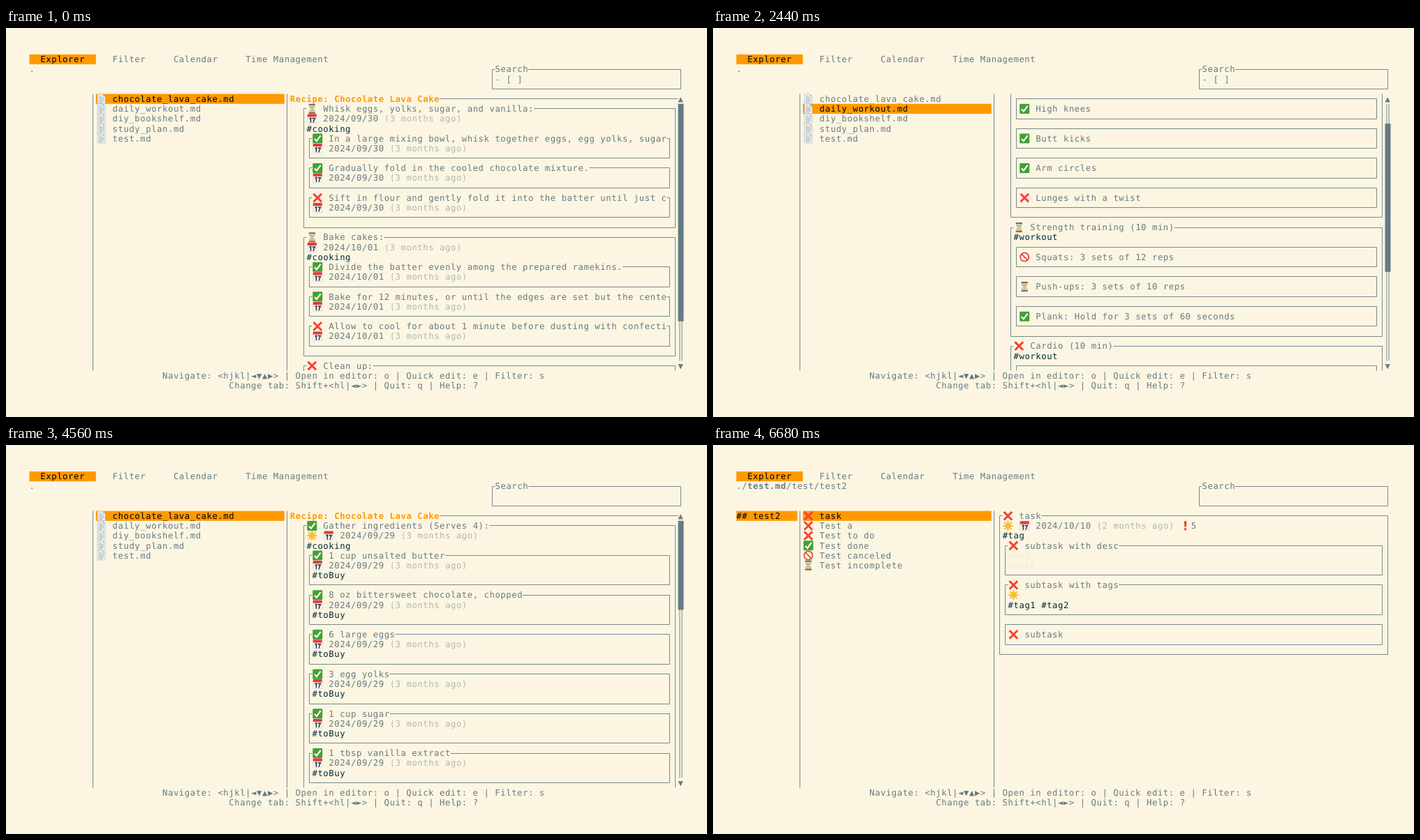
These frames come from a looping animation (1004 by 558 pixels, 8000 ms). An HTML page:

```html
<!DOCTYPE html>
<html lang="en">
<head>
<meta charset="utf-8">
<title>Task explorer</title>
<style>
  html, body { margin: 0; width: 100%; height: 100%; overflow: hidden; background: #fcf5e2; }
  svg { display: block; width: 100%; height: 100%; }
  .cell { font: 12.27px "DejaVu Sans Mono", monospace; letter-spacing: .554px; white-space: pre; text-rendering: geometricPrecision; }
  .bold { font-weight: bold; }
  .line { fill: none; stroke: #657b83; stroke-opacity: .88; }
</style>
</head>
<body>
<svg viewBox="0 0 1004 558">
  <defs>
    <clipPath id="pane"><rect x="404" y="94.6" width="600" height="397"/></clipPath>
    <symbol id="done" viewBox="0 0 16 16">
      <rect x=".4" y=".4" width="15.2" height="15.2" rx="1.4" fill="#43a035"/>
      <path d="M3.4 8.6 6.5 12 12.7 3.6" fill="none" stroke="#fff" stroke-width="2.3"/>
    </symbol>
    <symbol id="todo" viewBox="0 0 16 16">
      <path d="M1.7 1.7 14.3 14.3M14.3 1.7 1.7 14.3" stroke="#f44336" stroke-width="3.2"/>
    </symbol>
    <symbol id="wait" viewBox="0 0 16 16">
      <path d="M4 2h8v2.5Q12 6.5 9 8q3 1.5 3 3.500V14H4v-2.500Q4 9.500 7 8 4 6.500 4 4.500z" fill="#b9d5da" stroke="#8d8f86" stroke-width=".6"/>
      <path d="M4.700 4.500h6.600Q11 6.500 8.400 7.600V11l3 2.300H4.600L7.600 11V7.600Q5 6.500 4.700 4.500z" fill="#f6b62b"/>
      <path d="M3 .4h10v2H3zM3 13.600h10v2H3z" fill="#8a6450"/>
    </symbol>
    <symbol id="date" viewBox="0 0 16 16">
      <rect x="1" y=".8" width="14" height="14.600" rx="1" fill="#f5f5f3" stroke="#b8bfc1" stroke-width=".5"/>
      <path d="M1 5.300V1.800q0-1 1-1h12q1 0 1 1v3.500z" fill="#e5393d"/>
      <path d="M4 8.200 6 7v7.200M8.200 7.500h4.200q-2 3-2.300 6.700" fill="none" stroke="#30383c" stroke-width="1.700"/>
    </symbol>
    <symbol id="file" viewBox="0 0 16 16">
      <path d="M2 .6h8.500L14 4.200v11.200H2z" fill="#f0f2f2" stroke="#aab8bd" stroke-width=".7"/>
      <path d="M10.500.6V4.200H14z" fill="#a9bac1"/>
      <path d="M4 4h4.500M4 6.400h8M4 8.700h8M4 11h8M4 13.200h6" stroke="#93a3aa" stroke-width=".9"/>
    </symbol>
    <symbol id="ban" viewBox="0 0 16 16">
      <path d="M3.200 3.200 12.800 12.800" stroke="#e2453c" stroke-width="1.900"/>
      <circle cx="8" cy="8" r="6.600" fill="none" stroke="#e2453c" stroke-width="1.900"/>
    </symbol>
    <symbol id="sun" viewBox="0 0 16 16">
      <path d="M8 .2v15.600M.2 8h15.600M2.500 2.500l11 11M13.500 2.500l-11 11" stroke="#f8b01f" stroke-width="1.900"/>
      <circle cx="8" cy="8" r="4.700" fill="#fcc02c"/>
    </symbol>
    <symbol id="alert" viewBox="0 0 16 16">
      <path d="M6 .8h4L9.200 10H6.800z" fill="#ef3d35"/>
      <circle cx="8" cy="13.300" r="1.900" fill="#ef3d35"/>
    </symbol>
  </defs>
  <g id="screen"></g>
</svg>
<script>
const CELL_W = 7.941, CELL_H = 14.18, LEFT = 33.47, TOP = 37.9;
const FG = '#657b83', DIM = '#b1b8b3', DARK = '#002b36', FAINT = '#eee8d5', ORANGE = '#ff9900', BLACK = '#000';
const FIRST_ROW = 4, ROWS = 28, END_ROW = FIRST_ROW + ROWS, BAR_COL = 117;
const ICONS = { '✅': 'done', '❌': 'todo', '⏳': 'wait', '📅': 'date', '📄': 'file', '🚫': 'ban', '☀': 'sun', '❗': 'alert' };

const x = col => LEFT + col * CELL_W;
const y = row => TOP + row * CELL_H;
const midX = col => Math.floor(x(col + .5)) + .5;
const midY = row => Math.floor(y(row + .5)) + .5;
const clamp = (v, lo, hi) => Math.max(lo, Math.min(hi, v));
const escapeText = s => s.replace(/&/g, '&amp;').replace(/</g, '&lt;');

let out = '';
const line = d => { out += `<path class="line" d="${d}"/>`; };
const fillCells = (col, row, w, h, color) => {
  out += `<rect x="${x(col)}" y="${y(row)}" width="${w * CELL_W}" height="${h * CELL_H}" fill="${color}"/>`;
};

// Writes a string on the grid, icons taking two cells; returns the next free column.
function put(col, row, str, color = FG, bold = false) {
  let run = '', start = col;
  const flush = () => {
    if (run.trim()) out += `<text class="cell${bold ? ' bold' : ''}" x="${x(start)}" y="${y(row) + 11.35}" fill="${color}">${escapeText(run)}</text>`;
    run = '';
  };
  for (const ch of str) {
    if (ICONS[ch]) {
      flush();
      out += `<use href="#${ICONS[ch]}" x="${x(col) + .4}" y="${y(row) - .3}" width="14.8" height="14.8"/>`;
      start = col += 2;
    } else {
      run += ch;
      col++;
    }
  }
  flush();
  return col;
}

// A frame whose top edge resumes after a title ending at column titleEnd.
function box(l, r, top, bottom, titleEnd = l + 1) {
  line(`M${x(l + 1)} ${midY(top)}H${midX(l)}V${midY(bottom)}H${midX(r)}V${midY(top)}H${x(titleEnd)}`);
}

function putInfo(col, row, text) {
  if (text[0] === '#') put(col, row, text, DARK);
  else if (text.startsWith('desc')) put(col, row, text, FAINT);
  else for (const part of text.split(/(\(.*?\))/)) col = put(col, row, part, part[0] === '(' ? DIM : FG);
}

function drawTask([icon, name, info = [], subs = []], l, r, row) {
  const label = `${icon} ${name.slice(0, r - l - 4)}`;
  if (!info.length && !subs.length) {
    box(l, r, row, row + 2);
    put(l + 1, row + 1, label);
    return row + 3;
  }
  const titleEnd = put(l + 1, row, label);
  let next = row + 1;
  for (const text of info) putInfo(l + 1, next++, text);
  for (const sub of subs) next = drawTask(sub, l + 1, r - 1, next);
  box(l, r, row, next, titleEnd);
  return next + 1;
}

const ago = (day, months = 3) => `📅 2024/${day} (${months} months ago)`;
const dated = (icon, name, day) => [icon, name, [ago(day)]];
const toBuy = name => ['✅', name, [ago('09/29'), '#toBuy']];

const cakeOpen = { title: 'Recipe: Chocolate Lava Cake', total: 34, tasks: [
  ['⏳', 'Whisk eggs, yolks, sugar, and vanilla:', [ago('09/30'), '#cooking'], [
    dated('✅', 'In a large mixing bowl, whisk together eggs, egg yolks, sugar', '09/30'),
    dated('✅', 'Gradually fold in the cooled chocolate mixture.', '09/30'),
    dated('❌', 'Sift in flour and gently fold it into the batter until just c', '09/30')]],
  ['⏳', 'Bake cakes:', [ago('10/01'), '#cooking'], [
    dated('✅', 'Divide the batter evenly among the prepared ramekins.', '10/01'),
    dated('✅', 'Bake for 12 minutes, or until the edges are set but the cente', '10/01'),
    dated('❌', 'Allow to cool for about 1 minute before dusting with confecti', '10/01')]],
  ['❌', 'Clean up:', [ago('10/01')]]
] };

const cakeAll = { title: cakeOpen.title, total: 81, tasks: [
  ['✅', 'Gather ingredients (Serves 4):', ['☀ ' + ago('09/29'), '#cooking'],
    ['1 cup unsalted butter', '8 oz bittersweet chocolate, chopped', '6 large eggs', '3 egg yolks',
     '1 cup sugar', '1 tbsp vanilla extract', 'flour'].map(toBuy)]
] };

const workout = { title: 'Fitness: Daily Workout Plan (30 minutes)', total: 49, tasks: [
  ['❌', 'Warm up (5 min): Light jogging, jumping jacks, and dynamic stre', ['#workout'], [
    ['✅', 'High knees'], ['✅', 'Butt kicks'], ['✅', 'Arm circles'], ['❌', 'Lunges with a twist']]],
  ['⏳', 'Strength training (10 min)', ['#workout'], [
    ['🚫', 'Squats: 3 sets of 12 reps'], ['⏳', 'Push-ups: 3 sets of 10 reps'],
    ['✅', 'Plank: Hold for 3 sets of 60 seconds']]],
  ['❌', 'Cardio (10 min)', ['#workout'], [
    ['❌', 'Treadmill walk/jog at an incline of 2.0 and a speed of 4.5 mp'],
    ['❌', 'Stationary bike: Pedal at a moderate resistance for 10 minute']]]
] };

const testTasks = [
  ['❌', 'task', [`☀ ${ago('10/10', 2)} ❗5`, '#tag'], [
    ['❌', 'subtask with desc', ['desc', 'desc2']],
    ['❌', 'subtask with tags', ['☀', '#tag1 #tag2']],
    ['❌', 'subtask']]],
  ['❌', 'Test a', [], [['❌', 'Test b', [], [['❌', 'Test c']]]]],
  ['❌', 'Test to do'], ['✅', 'Test done'], ['🚫', 'Test canceled'], ['⏳', 'Test incomplete']
];
const testSection = { title: 'test2', total: 35, tasks: testTasks };
const testList = { total: 34, tasks: testTasks };
const testTask = { tasks: testTasks.slice(0, 1) };

const files = ['chocolate_lava_cake', 'daily_workout', 'diy_bookshelf', 'study_plan', 'test'].map(n => `📄 ${n}.md`);
const taskNames = testTasks.map(([icon, name]) => `${icon} ${name}`);

function drawScrollbar(offset, total) {
  const track = ROWS - 2, first = FIRST_ROW + 1;
  const at = n => Math.round(n * track / (total - 1));
  const start = at(offset), end = at(offset + ROWS);
  const mid = x(BAR_COL + .5), span = `${y(first)}V${y(first + track)}`;
  put(BAR_COL, FIRST_ROW, '▲');
  put(BAR_COL, END_ROW - 1, '▼');
  line(`M${mid - 1.6} ${span}M${mid + 1.6} ${span}`);
  fillCells(BAR_COL, first + start, 1, end - start, FG);
}

function drawDetail({ title, total, tasks }, offset) {
  let row = FIRST_ROW - offset, l = 47;
  const r = total ? 116 : 117;
  out += '<g clip-path="url(#pane)">';
  if (title) {
    const end = put(l, row, title, ORANGE, true);
    line(`M${x(end)} ${midY(row)}H${x(BAR_COL)}`);
    row++;
    l += 2;
  }
  for (const task of tasks) row = drawTask(task, l, r, row);
  out += '</g>';
  if (total) drawScrollbar(offset, total);
}

function drawList(col, width, items, selected) {
  items.forEach((item, i) => {
    const row = FIRST_ROW + i, on = i === selected;
    if (on) fillCells(col, row, width, 1, ORANGE);
    put(col, row, [...item].slice(0, width - (ICONS[[...item][0]] ? 1 : 0)).join(''), on ? BLACK : FG);
  });
}

function drawChrome(query, path) {
  fillCells(0, 0, 12, 1, ORANGE);
  put(2, 0, 'Explorer', BLACK);
  put(15, 0, 'Filter');
  put(26, 0, 'Calendar');
  put(39, 0, 'Time Management');
  let col = 0;
  for (const part of path.split(/(test\.md)/)) col = put(col, 1, part, FG, part === 'test.md');
  box(83, 117, 1, 3, put(84, 1, 'Search'));
  put(84, 2, query);
  for (const c of [11, 46]) line(`M${midX(c)} ${y(FIRST_ROW)}V${y(END_ROW)}`);
  put(24, 32, 'Navigate: <hjkl|◄▼▲▶> | Open in editor: o | Quick edit: e | Filter: s');
  put(36, 33, 'Change tab: Shift+<hl|◄►> | Quit: q | Help: ?');
}

const scrollTimes = [2040, 2240, 2440, 2560, 2640, 2800, 2960, 3160, 3320];

function sceneAt(t) {
  const scene = { query: '', path: '.', parents: [], parent: -1, items: files, selected: 0, offset: 0 };
  if (t < 4520) {
    const erased = clamp(Math.floor((t - 4240) / 40), 0, 5);
    return { ...scene, query: '- [ ]'.slice(0, 5 - erased), selected: t < 1200 ? 0 : 1,
      view: t < 1200 ? cakeOpen : workout, offset: scrollTimes.filter(s => t >= s).length };
  }
  if (t < 5680) {
    const selected = clamp(Math.floor((t - 5480) / 40), 0, 4);
    return { ...scene, selected, view: [cakeAll, workout, workout, workout, testSection][selected] };
  }
  if (t < 6200) return { ...scene, path: './test.md', parents: files, parent: 4, items: ['# test'], view: testSection };
  if (t < 6680) return { ...scene, path: './test.md/test', parents: ['# test'], parent: 0, items: ['## test2'], view: testList };
  return { ...scene, path: './test.md/test/test2', parents: ['## test2'], parent: 0, items: taskNames, view: testTask };
}

const screenGroup = document.getElementById('screen');
let shown = '';

function render(t) {
  const s = sceneAt(t);
  out = '';
  drawChrome(s.query, s.path);
  drawList(0, 11, s.parents, s.parent);
  drawList(12, 34, s.items, s.selected);
  drawDetail(s.view, s.offset);
  if (out !== shown) screenGroup.innerHTML = shown = out;
}

const begin = performance.now();
function tick() {
  render((performance.now() - begin) % 8000);
  requestAnimationFrame(tick);
}
tick();
</script>
</body>
</html>
```
